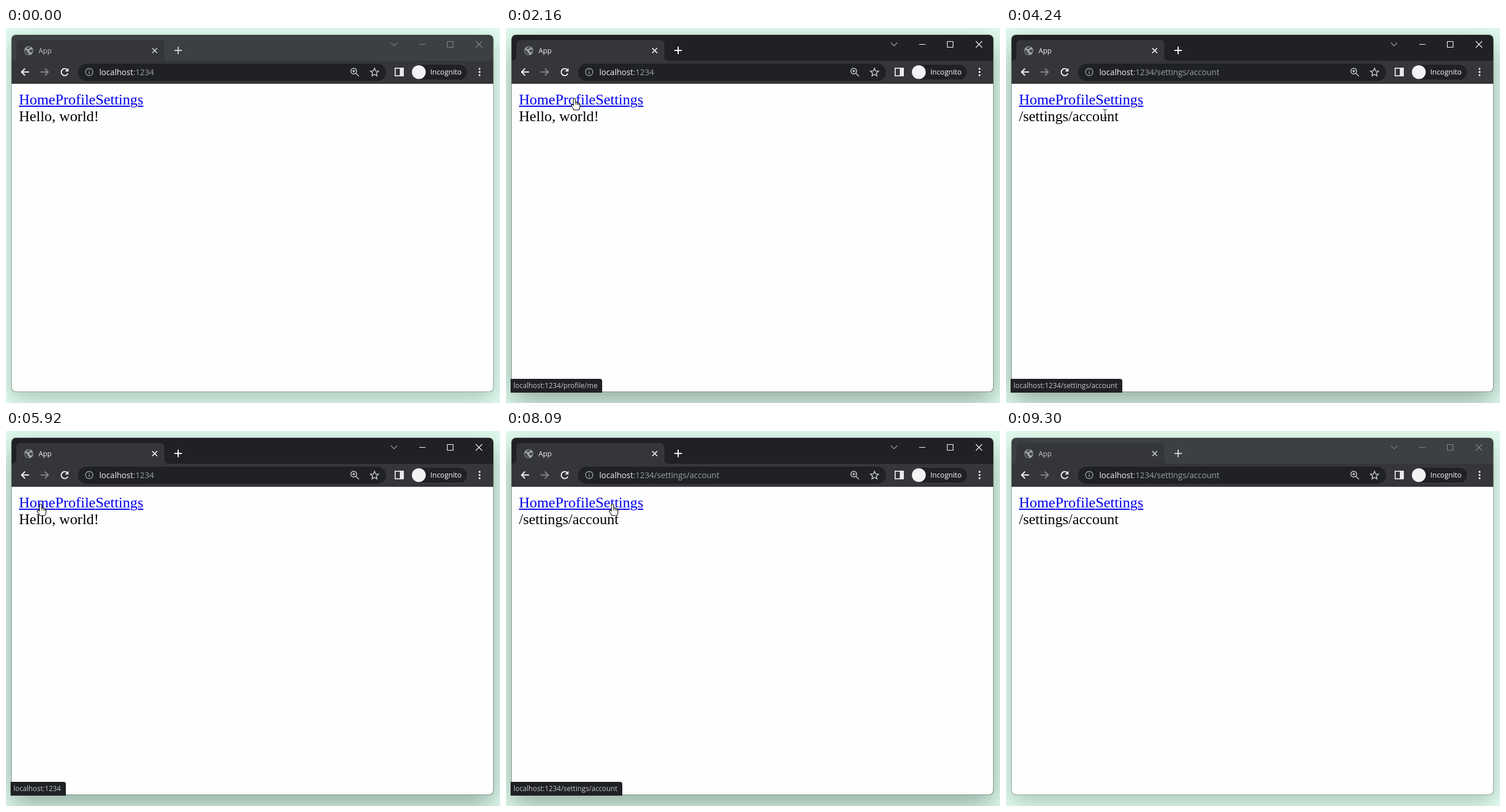
An HTML page with a canvas that plays this animation: 858x652 px, repeating every 9370 ms.

```html
<!DOCTYPE html>
<html lang="en">
<head>
<meta charset="utf-8">
<title>Routing demo</title>
<style>
html, body { margin: 0; width: 100%; height: 100%; overflow: hidden; background: #e1fcef; }
canvas { display: block; width: 858px; height: 652px; }
</style>
</head>
<body>
<canvas id="stage" width="858" height="652"></canvas>
<script>
const ctx = document.getElementById('stage').getContext('2d');
const LOOP = 9370, STEP = 70;
const SANS = '"Open Sans", "Noto Sans", sans-serif';
const SERIF = '"Liberation Serif", serif';
const PAGE_FONT = `25.75px ${SERIF}`;
const PAGE_X = 22.5;
const HOME = '', PROFILE = '/profile/me', SETTINGS = '/settings/account';

// [time, route shown]
const routes = [[0, HOME], [2420, PROFILE], [3710, SETTINGS], [5000, HOME], [6600, PROFILE], [7680, SETTINGS]];
// [time, route named in the status bubble]
const hovers = [[0, HOME], [2020, PROFILE], [2960, SETTINGS], [4660, HOME], [6060, PROFILE], [7070, SETTINGS]];
// [from, to, index of the pressed link]
const presses = [[2290, 2420, 1], [3640, 3710, 2], [4930, 5000, 0], [6470, 6600, 1], [7540, 7680, 2]];
// [time, opacity] of the status bubble
const fades = [[0, 0], [1210, 0], [1410, 1], [4480, 1], [4620, 0.2], [4660, 0.2], [4800, 1], [8370, 1], [8600, 0]];
// [start, steps, x, y, easing power]
const moves = [
  [230, 12, 84, 137, 0.5], [1070, 1, 78, 129], [1140, 3, 72, 126],
  [1950, 4, 119, 122.5], [2820, 6, 180, 130],
  [4240, 1, 172, 149], [4310, 4, 80, 152], [4590, 4, 52, 126],
  [5920, 1, 60, 127], [5990, 5, 116, 122],
  [6930, 5, 183, 125], [8090, 1, 185, 127], [8160, 5, 590, 560, 1.6]
];
const ENTER = 230, LEAVE = 8510;

const latest = (list, t) => list.filter(item => item[0] <= t).pop()[1];

function opacityAt(t) {
  const next = fades.findIndex(f => f[0] > t);
  if (next < 0) return 0;
  const [t0, a] = fades[next - 1], [t1, b] = fades[next];
  return a + (b - a) * (t - t0) / (t1 - t0);
}

function cursorAt(t) {
  let x = 420, y = 640;
  for (const [start, steps, toX, toY, power = 1] of moves) {
    if (t < start) break;
    const p = Math.min(1, (Math.floor((t - start) / STEP) + 1) / steps) ** power;
    x += (toX - x) * p;
    y += (toY - y) * p;
  }
  return { x, y };
}

function text(str, x, y, font, color) {
  ctx.font = font;
  ctx.fillStyle = color;
  ctx.fillText(str, x, y);
  return ctx.measureText(str).width;
}

function box(x, y, w, h, r, color) {
  ctx.beginPath();
  ctx.roundRect(x, y, w, h, r);
  ctx.fillStyle = color;
  ctx.fill();
}

function disc(x, y, r, color) {
  ctx.beginPath();
  ctx.arc(x, y, r, 0, Math.PI * 2);
  ctx.fillStyle = color;
  ctx.fill();
}

function line(path, color, width = 1) {
  ctx.strokeStyle = color;
  ctx.lineWidth = width;
  ctx.stroke(new Path2D(path));
}

function shape(path, color) {
  ctx.fillStyle = color;
  ctx.fill(new Path2D(path));
}

const ring = (x, y, r) => `M${x - r} ${y}a${r} ${r} 0 1 0 ${2 * r} 0a${r} ${r} 0 1 0 ${-2 * r} 0`;

function starPath(x, y, r) {
  let d = '';
  for (let i = 0; i < 10; i++) {
    const a = -Math.PI / 2 + i * Math.PI / 5, k = i % 2 ? r * 0.45 : r;
    d += `${i ? 'L' : 'M'}${x + k * Math.cos(a)} ${y + k * Math.sin(a)}`;
  }
  return d + 'Z';
}

function drawBackdrop(focused) {
  ctx.fillStyle = '#e1fcef';
  ctx.fillRect(0, 0, 858, 652);
  ctx.save();
  ctx.shadowColor = `rgba(0,20,10,${focused ? 0.36 : 0.25})`;
  ctx.shadowBlur = focused ? 46 : 36;
  ctx.shadowOffsetY = focused ? 17 : 12;
  box(10, 12, 836, 620, 8, '#fff');
  ctx.restore();
  box(9, 11.5, 838, 621.5, 8, focused ? '#80928a' : '#92a59c');
}

function drawTabStrip(focused) {
  const bright = focused ? '#ffffff' : '#cdd0d3';
  const control = focused ? '#ffffff' : '#85888b';
  ctx.fillStyle = focused ? '#202124' : '#3c4043';
  ctx.fillRect(9, 12, 838, 46);
  shape('M10 57Q18 57 18 49V29Q18 21 26 21H267Q275 21 275 29V49Q275 57 283 57Z', '#35363a');

  disc(39.5, 39.5, 7.8, '#a3a8ac');
  shape('M33 37L37 40L38 43L40 44V47Q34 46 32.5 41ZM39 32.5L43 33L41 36L37 37L35 35ZM41 38L46 37L46.5 41L43 43L40 40Z', '#45484c');

  text('App', 56.5, 44, `12.3px ${SANS}`, focused ? '#f1f3f4' : '#c4c7ca');
  line('M254 35L262.5 43.5M262.5 35L254 43.5', bright, 1.7);
  line('M292.5 39H305.5M299 32.5V45.5', bright, 2);
  line('M668.5 25.5L674 31L679.5 25.5', focused ? '#a4a6a8' : '#777a7d', 1.1);
  line('M717.5 28.5H728.5M766.5 23.5H776.5V33.5H766.5ZM816 23L827 34M827 23L816 34', control, 1.1);
}

function drawToolbar(route) {
  const icon = '#e8eaed', dim = '#9aa0a6';
  ctx.fillStyle = '#35363a';
  ctx.fillRect(9, 57, 838, 40);
  line('M40 76.5H27.5M33 70.5L27 76.5L33 82.5', '#fff', 1.8);
  line('M60 76.5H72.5M67.5 70.5L73.5 76.5L67.5 82.5', '#85878a', 1.8);
  line('M107.5 79A6 6 0 1 1 106 72.2', '#fff', 1.8);
  shape('M108.5 69.5V75.5H102.5Z', '#fff');

  box(125, 62, 535, 30, 15, '#202124');
  line(ring(144.5, 76.5, 6.3), dim, 1.4);
  line('M144.5 75.5V80M144.5 72.7V74.1', dim, 1.5);
  const font = `14.1px ${SANS}`;
  const hostWidth = text('localhost', 162, 82, font, '#f1f3f4');
  text(':1234' + route, 162 + hostWidth, 82, font, dim);

  line(ring(604, 75, 5), '#c6c9cc', 1.5);
  line('M607.7 78.7L613 84M601.5 75H606.5M604 72.5V77.5', '#c6c9cc', 1.5);
  line(starPath(640, 77.4, 7.4), '#d2d5d8', 1.4);
  line('M675.9 69.9H690.1V83.1H675.9Z', icon, 1.8);
  ctx.fillStyle = icon;
  ctx.fillRect(684, 69.5, 6.5, 14);

  box(704, 62.5, 98, 28.5, 14.2, '#414246');
  box(705, 63.5, 96, 26.5, 13.2, '#202124');
  disc(717, 76.7, 12, '#f1f3f4');
  text('Incognito', 737, 81, `12.5px ${SANS}`, '#fff');
  for (const y of [71, 76.5, 82]) disc(822.5, y, 1.7, icon);
}

function drawPage(route, pressed) {
  box(10, 97, 836, 535, [0, 0, 7, 7], '#fefefe');
  let x = PAGE_X;
  ['Home', 'Profile', 'Settings'].forEach((label, i) => {
    const color = i === pressed ? '#ff0000' : '#0000ee';
    const width = text(label, x, 133, PAGE_FONT, color);
    // the underline breaks around the descender of "g"
    const gap = label.indexOf('g');
    if (gap < 0) {
      ctx.fillRect(x, 135, width, 2);
    } else {
      const left = ctx.measureText(label.slice(0, gap)).width - 0.5;
      const right = ctx.measureText(label.slice(0, gap + 1)).width + 0.5;
      ctx.fillRect(x, 135, left, 2);
      ctx.fillRect(x + right, 135, width - right, 2);
    }
    x += width;
  });
  return text(route || 'Hello, world!', PAGE_X, 162, PAGE_FONT, '#000');
}

function drawStatus(route, alpha) {
  if (alpha <= 0) return;
  const font = `12.2px ${SANS}`, label = 'localhost:1234' + route;
  ctx.save();
  ctx.globalAlpha = alpha;
  ctx.font = font;
  box(8, 610, Math.round(ctx.measureText(label).width + 13.5), 24, [0, 4, 0, 0], '#202124');
  text(label, 13, 626, font, '#c4c8cc');
  ctx.restore();
}

const HAND = 'M-2 2Q-2 0 0 0Q2 0 2 2V7Q4 6 5 8Q7 7 7.5 9Q9.5 8.5 9.5 11V14Q9.5 17 7.5 20H-1Q-3 16 -6 12.5Q-5 9.5 -2 12Z';
const ARROW = 'M0 0V16L4 12.5L6.5 18.5L9 17.5L6.5 11.5H11.5Z';
const BEAM = 'M-3.5 -7.5Q-.5 -7.5 0 -6.5Q.5 -7.5 3.5 -7.5M0 -6.5V6.5M-3.5 7.5Q-.5 7.5 0 6.5Q.5 7.5 3.5 7.5';

function drawCursor({ x, y }, lineWidth) {
  const onLink = x > 22 && x < 239 && y > 111 && y < 139;
  const onText = x > 22 && x < PAGE_X + lineWidth && y >= 139 && y < 168;
  ctx.save();
  ctx.translate(x, y);
  if (onText) {
    line(BEAM, '#333', 1.1);
  } else {
    shape(onLink ? HAND : ARROW, '#fff');
    line(onLink ? HAND : ARROW, '#000', 1.1);
    if (onLink) line('M2 7V11M5 8V11.5M7.5 9.5V12', '#000', 0.9);
  }
  ctx.restore();
}

function draw(t) {
  const focused = t >= 120 && t < 9300;
  const route = latest(routes, t);
  const press = presses.find(([from, to]) => t >= from && t < to);
  drawBackdrop(focused);
  ctx.save();
  ctx.beginPath();
  ctx.roundRect(9.7, 12, 836.6, 620.3, 8);
  ctx.clip();
  drawTabStrip(focused);
  drawToolbar(route);
  const lineWidth = drawPage(route, press ? press[2] : -1);
  ctx.restore();
  drawStatus(latest(hovers, t), opacityAt(t));
  if (t >= ENTER && t < LEAVE) drawCursor(cursorAt(t), lineWidth);
}

const startTime = performance.now();
function tick() {
  draw((performance.now() - startTime) % LOOP);
  requestAnimationFrame(tick);
}
tick();
</script>
</body>
</html>
```
